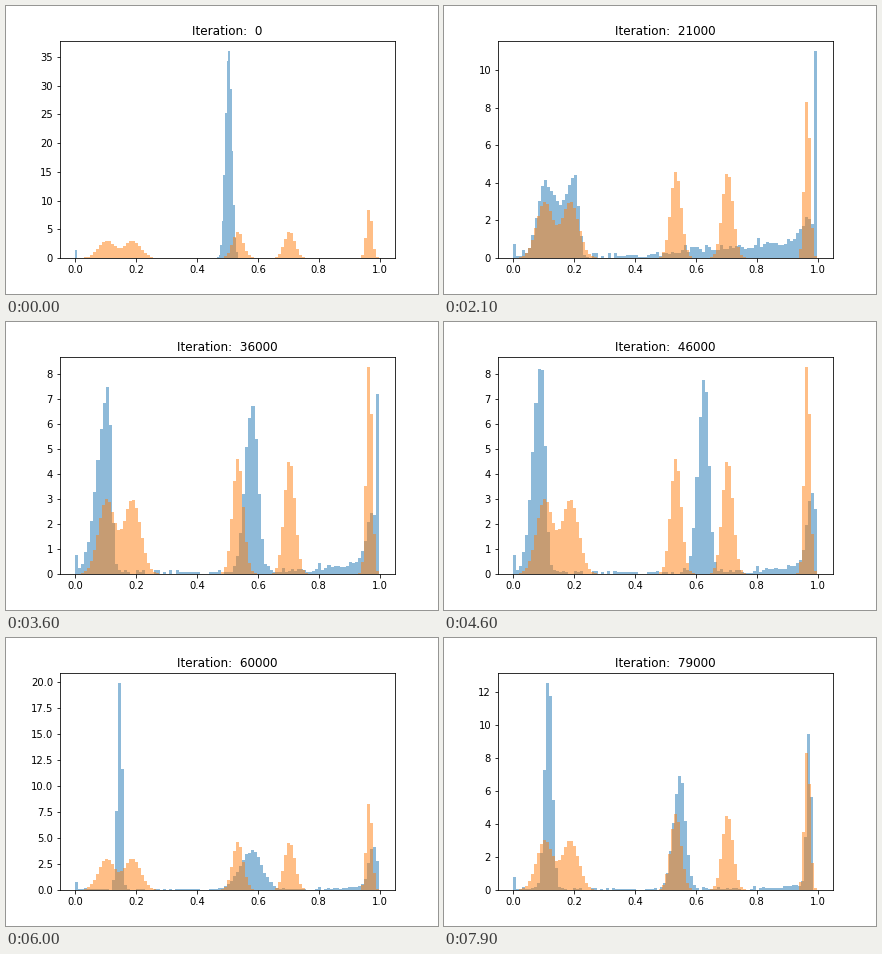
Recreate the animation shown at these times as a matplotlib script. Size 432 by 288 pixels, loop 8000 ms.

```python
import numpy as np
import matplotlib.pyplot as plt
from matplotlib.animation import FuncAnimation

FRAMES, BINS, SUB = 80, 100, 8

# Turning points of the two wandering modes; "spread" is left + right width.
TURNS = [21, 36, 46, 54, 67, 79]
LOW_CENTRE = [.102, .109, .092, .126, .175, .1175]
LOW_SPREAD = [.065, .043, .0375, .0235, .0152, .0235]
LOW_SKEW = [.34, .78, .67, .77, .50, .52]
MID_CENTRE = [.580, .582, .627, .564, .605, .550]
MID_SPREAD = [.120, .040, .0335, .044, .105, .0385]
COLLAPSES = [30, 40.4, 50.5, 59, 75]  # the low mode briefly turns into a spike

speckle = .1 * np.random.default_rng(4).poisson(.9, BINS)


def ease(u):
    u = np.clip(u, 0, 1)
    return u * u * (3 - 2 * u)


def bump(x, mass, mu, spread, skew=.5):
    """Two-sided Gaussian whose height follows from its mass."""
    s = spread * np.where(x < mu, skew, 1 - skew)
    height = mass / (spread * np.sqrt(np.pi / 2))
    return height * np.exp(-.5 * ((x - mu) / s) ** 2)


def binned(bumps, lo, hi):
    x = lo + (hi - lo) * (np.arange(BINS * SUB) + .5) / (BINS * SUB)
    y = sum(bump(x, *b) for b in bumps)
    return y.reshape(BINS, SUB).mean(axis=1)


def generated(t):
    def turn(values):
        return np.interp(t, TURNS, values)

    grow = ease(t / 12)
    twin = 1 - ease((t - 21) / 12)
    fade = np.exp(-max(t - 21, 0) / 12)
    pinch = max(np.exp(-((t - c) / 1.5) ** 2) for c in COLLAPSES)

    low_spread = turn(LOW_SPREAD) * (1 - pinch) + .011 * pinch
    high_keys = [21, 46, 67, 79]
    high_mu = np.interp(t, high_keys, [.975, .982, .977, .973])
    high_spread = 2 * np.interp(t, high_keys, [.025, .016, .0135, .007])
    high_mass = np.interp(t, [21, 79], [.075, .18])
    tail_left, tail_height = .07 + .13 * fade, .2 + .55 * fade
    tail_spread = tail_left + .05

    bumps = [
        (.4 - .08 * twin, turn(LOW_CENTRE), low_spread, turn(LOW_SKEW)),
        (.2 * twin, .203, .039, .69),
        (.335 - .305 * twin, turn(MID_CENTRE), turn(MID_SPREAD), .56),
        (high_mass, high_mu, high_spread),
        (tail_height * tail_spread * np.sqrt(np.pi / 2), .95,
         tail_spread, tail_left / tail_spread),
    ]
    bumps = [(grow * mass, *shape) for mass, *shape in bumps]
    bumps.append((.97 * (1 - grow), .504, .021 + .03 * t))

    top = np.interp(t, [0, 8, 67, 79], [.535, 1, .997, .986])
    h = binned(bumps, 0, top) + grow * (.6 + .6 * fade) * speckle
    h[0] = .0075 * BINS / top
    h[-1] += np.interp(t, [0, 10, 21, 36, 45], [0, 10, 9.5, 5.3, 0])
    return top, h


def real():
    lo, hi = .02, .998
    modes = [(.104, .0266), (.188, .0266), (.535, .0171),
             (.7035, .0172), (.9664, .0088)]
    bumps = [(.2, mu, 2 * s) for mu, s in modes]
    return np.linspace(lo, hi, BINS + 1), binned(bumps, lo, hi)


fig, ax = plt.subplots(figsize=(6, 4), dpi=72)
fig.subplots_adjust(left=.125, right=.9, bottom=.125, top=.88)

blue = ax.bar(np.arange(BINS) / BINS, np.ones(BINS), 1 / BINS,
              align="edge", color="C0", alpha=.5)
edges, truth = real()
ax.bar(edges[:-1], truth, np.diff(edges), align="edge", color="C1", alpha=.5)
ax.set_xlim(-.05, 1.05)
title = ax.set_title("")


def update(t):
    top, heights = generated(t)
    w = top / BINS
    for i, (bar, h) in enumerate(zip(blue, heights)):
        bar.set(x=i * w, width=w, height=h)
    ax.set_ylim(0, 1.05 * max(heights.max(), truth.max()))
    title.set_text(f"Iteration:  {t * 1000}")
    return [*blue, title]


anim = FuncAnimation(fig, update, frames=FRAMES, interval=100,
                     repeat=True, repeat_delay=0, blit=False)
plt.show()
```
